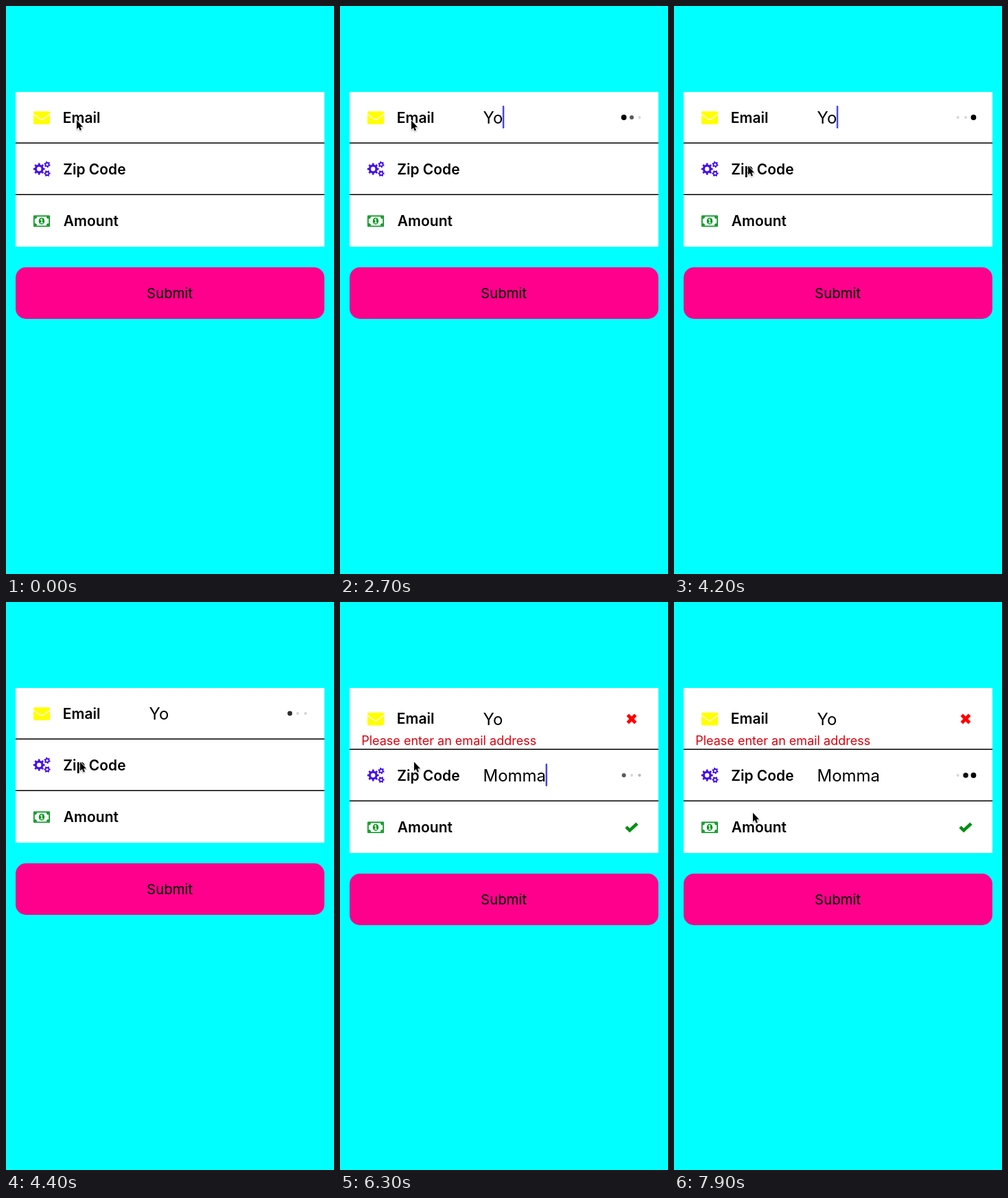
An HTML page with a canvas for the animation above (8 s loop, 478 by 826 pixels).

```html
<!DOCTYPE html>
<html lang="en">
<head>
<meta charset="utf-8">
<title>Form validation</title>
<style>
  html, body { margin: 0; width: 100%; height: 100%; overflow: hidden; background: #0ff; }
  canvas { display: block; }
</style>
</head>
<body>
<canvas id="stage" width="478" height="826"></canvas>
<script>
const ctx = document.getElementById('stage').getContext('2d');
const LOOP = 8000;
const FONT = 'Inter, "Open Sans", sans-serif';
const INPUT_X = 208.5;
const FOCUS_EMAIL = 700, FOCUS_ZIP = 4500;
const EMAIL_KEYS = [2500, 2700];
const ZIP_KEYS = [5500, 5650, 5850, 6000, 6200];

const clamp = v => Math.max(0, Math.min(1, v));
const smooth = v => { v = clamp(v); return v * v * (3 - 2 * v); };
const mix = (a, b, k) => a + (b - a) * k;

function text(str, x, y, size, weight = 400, color = '#000', align = 'left') {
  ctx.font = `${weight} ${size}px ${FONT}`;
  ctx.fillStyle = color;
  ctx.textAlign = align;
  ctx.fillText(str, x, y);
}

function rect(x, y, w, h, color, r = 0) {
  ctx.fillStyle = color;
  ctx.beginPath();
  ctx.roundRect(x, y, w, h, r);
  ctx.fill();
}

function disc(x, y, rx, color, ry = rx) {
  ctx.fillStyle = color;
  ctx.beginPath();
  ctx.ellipse(x, y, rx, ry, 0, 0, 2 * Math.PI);
  ctx.fill();
}

function trace(points) {
  ctx.beginPath();
  points.forEach(([x, y], i) => i ? ctx.lineTo(x, y) : ctx.moveTo(x, y));
}

function line(points, width, color) {
  trace(points);
  ctx.lineWidth = width;
  ctx.strokeStyle = color;
  ctx.lineJoin = 'miter';
  ctx.stroke();
}

function envelope(y) {
  rect(40, y - 9.2, 24, 18.6, '#ff0', 2);
  ctx.beginPath();
  ctx.moveTo(39.5, y - 5.5);
  ctx.lineTo(48.5, y + 1);
  ctx.quadraticCurveTo(52, y + 4.2, 55.5, y + 1);
  ctx.lineTo(64.5, y - 5.5);
  ctx.lineWidth = 1.5;
  ctx.strokeStyle = '#fff';
  ctx.stroke();
}

function gear(x, y, r, hole, teeth, turn) {
  const points = [];
  const step = 2 * Math.PI / teeth;
  for (let i = 0; i < teeth; i++) {
    for (const [offset, k] of [[-0.29, 0.76], [-0.2, 1], [0.2, 1], [0.29, 0.76]]) {
      const a = turn + (i + offset) * step;
      points.push([x + r * k * Math.cos(a), y + r * k * Math.sin(a)]);
    }
  }
  trace(points);
  ctx.closePath();
  ctx.fillStyle = '#4610eb';
  ctx.fill();
  disc(x, y, hole, '#fff');
}

function gears(y) {
  gear(48.2, y, 8.5, 3.2, 8, 0);
  gear(60, y - 6.5, 4.7, 1.6, 6, 0.3);
  gear(60, y + 6.5, 4.7, 1.6, 6, 0);
}

function banknote(y) {
  const green = '#00961c';
  rect(40, y - 8.3, 24, 16.6, green, 1);
  ctx.save();
  ctx.beginPath();
  ctx.rect(41.7, y - 6.6, 20.6, 13.2);
  ctx.clip();
  rect(41, y - 8, 22, 16, '#fff');
  for (const x of [41.7, 62.3])
    for (const dy of [-6.6, 6.6]) disc(x, y + dy, 3.3, green);
  ctx.restore();
  disc(52, y, 4.2, green, 5);
  line([[50.2, y - 1.6], [52.1, y - 2.9], [52.1, y + 2.8]], 1.4, '#fff');
  rect(50, y + 2.1, 4.2, 1.2, '#fff');
}

function cross(x, y) {
  for (const s of [-1, 1])
    line([[x - 5.7, y - 5.7 * s], [x + 5.7, y + 5.7 * s]], 5, '#f00');
}

function check(x, y) {
  line([[x - 8, y - 0.8], [x - 2.8, y + 4.1], [x + 8, y - 5.8]], 4.6, '#008f12');
}

function dots(y, t) {
  const period = 960, stagger = 240;
  for (let i = 0; i < 3; i++) {
    const age = t - 2680 - i * stagger;
    const distance = Math.abs(age - Math.round(age / period) * period);
    const k = smooth((290 - distance) / 130);
    const shade = Math.round(mix(212, 0, k));
    disc(413.7 + 11.4 * i, y, mix(1.9, 3.9, k), `rgb(${shade},${shade},${shade})`);
  }
}

function caret(x, y, age) {
  const p = Math.max(0, age) % 1000 / 1000;
  ctx.globalAlpha = p < 0.75 ? clamp((0.6 - p) * 10) : clamp((p - 0.9) * 10);
  rect(x, y - 17, 2.5, 33, '#4a46e0', 1);
  ctx.globalAlpha = 1;
}

function input(value, keys, y, t, active, firstBlink) {
  const shown = value.slice(0, keys.filter(k => t >= k).length);
  text(shown, INPUT_X, y + 9, 24);
  if (!active) return;
  const last = keys.filter(k => t >= k).pop() ?? firstBlink;
  caret(INPUT_X + ctx.measureText(shown).width - 0.5, y, t - last);
}

function pointer(t) {
  const a = smooth((t - 50) / 350);
  const b = smooth((t - 3800) / 380);
  const c = smooth((t - 7200) / 500);
  ctx.save();
  ctx.translate(102.5 + a + 4 * b + 7 * c, 165.5 + 0.5 * a + 66 * b + 74 * c);
  trace([[0.5, 0.5], [0.5, 13.6], [3.4, 10.9], [5.3, 15.4],
         [7.5, 14.4], [5.7, 10.2], [9.6, 10.2]]);
  ctx.closePath();
  ctx.lineJoin = 'round';
  ctx.lineWidth = 1.8;
  ctx.strokeStyle = '#fff';
  ctx.shadowColor = 'rgba(0,0,0,.3)';
  ctx.shadowBlur = 2;
  ctx.shadowOffsetY = 1;
  ctx.stroke();
  ctx.shadowColor = 'transparent';
  ctx.fillStyle = '#000';
  ctx.fill();
  ctx.restore();
}

function draw(t) {
  const checked = t >= FOCUS_ZIP;
  const grow = checked ? 15 : 0;
  const emailY = 162 + grow / 2, zipY = 237 + grow, amountY = 313 + grow;

  rect(0, 0, 478, 826, '#0ff');
  rect(14, 125, 450, 225 + grow, '#fff');
  rect(14, 198.4 + grow, 450, 1.5, '#000');
  rect(14, 273.4 + grow, 450, 1.5, '#000');

  envelope(emailY + 0.5);
  gears(zipY);
  banknote(amountY - 0.2);
  text('Email', 82.8, emailY + 7.5, 21, 600);
  text('Zip Code', 83.2, zipY + 7.5, 21, 600);
  text('Amount', 83.8, amountY + 7.3, 21, 600);

  input('Yo', EMAIL_KEYS, emailY, t, t >= FOCUS_EMAIL && !checked, 800);
  input('Momma', ZIP_KEYS, zipY, t, checked, FOCUS_ZIP);

  if (checked) {
    text('Please enter an email address', 31.2, 207.5, 18, 400, '#d9000d');
    cross(425, 170);
    check(425, amountY);
    dots(zipY, t);
  } else if (t >= FOCUS_EMAIL) {
    dots(emailY, t);
  }

  rect(14, 380 + grow, 450, 75, '#ff008c', 15);
  text('Submit', 238.6, 425 + grow, 20.4, 400, '#000', 'center');
  pointer(t);
}

const start = performance.now();
function tick() {
  draw((performance.now() - start) % LOOP);
  requestAnimationFrame(tick);
}
tick();
</script>
</body>
</html>
```
